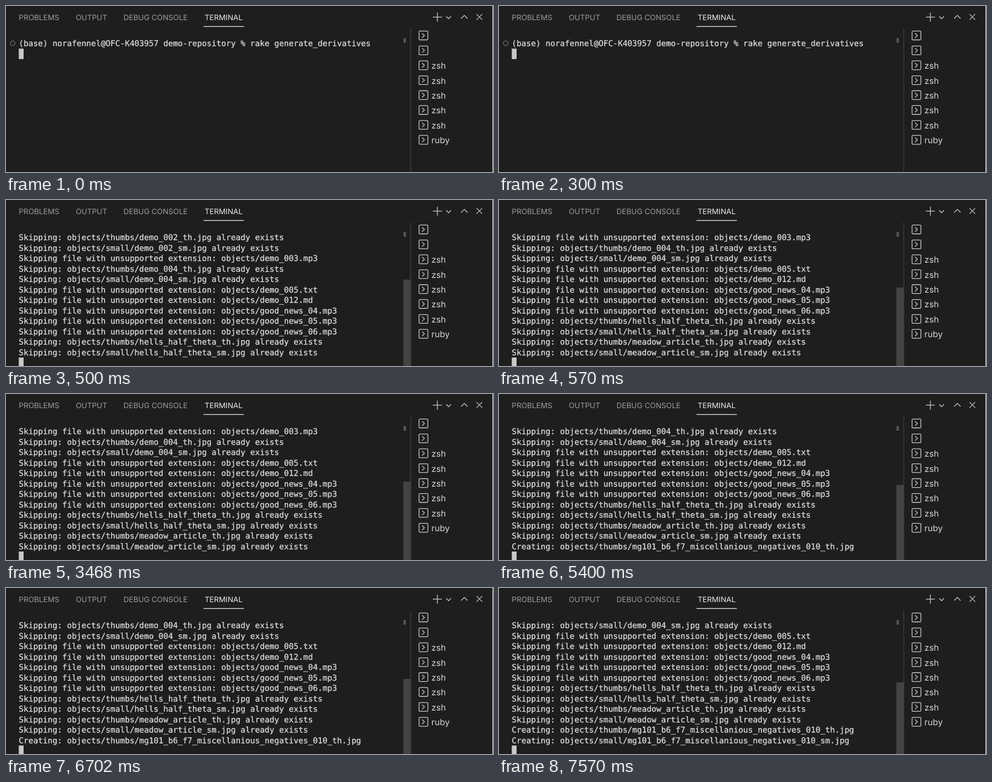
Recreate the animation shown at these times as an HTML page. Size 858 px wide and 294 px high, loop 8 s.

```html
<!DOCTYPE html>
<html lang="en">
<head>
<meta charset="utf-8">
<title>Terminal</title>
<style>
  html, body { margin: 0; width: 100%; height: 100%; overflow: hidden; background: #1e1e1e; }
  svg { display: block; width: 858px; height: 294px; }
  text { white-space: pre; text-rendering: geometricPrecision; }
  .tabs { font: 13.2px Inter, sans-serif; fill: #9d9d9d; }
  .tabs .active { fill: #ececec; }
  .shells { font: 15.2px Inter, sans-serif; fill: #d6d6d6; }
  .lines { font: 14.12px "DejaVu Sans Mono", monospace; fill: #e0e0e0; stroke: #e0e0e0; stroke-width: .25; }
  .icon { fill: none; stroke: #cacaca; stroke-width: 1.3; }
</style>
</head>
<body>
<svg viewBox="0 0 858 294">
  <rect width="858" height="294" fill="#1e1e1e"/>
  <g class="tabs">
    <text x="22.5" y="25">PROBLEMS</text>
    <text x="123" y="25">OUTPUT</text>
    <text x="207" y="25">DEBUG CONSOLE</text>
    <text x="350" y="25" class="active">TERMINAL</text>
  </g>
  <rect x="348" y="35.7" width="71" height="1.3" fill="#e7e7e7"/>
  <path class="icon" d="M752 19.7h16M760 11.7v16M775.5 18.2l4.3 4.3 4.3-4.3M801.8 22.3l5.7-5.7 5.7 5.7M829 14.4l10 10m0-10l-10 10"/>
  <rect x="712.5" y="40" width="1.3" height="254" fill="#414141"/>
  <rect x="700.5" y="57" width="4" height="8" fill="#5a5a5a"/>
  <g id="shells" class="shells"></g>
  <circle id="mark" cx="11.7" cy="66" r="4.1" fill="none" stroke="#6a6a6a" stroke-width="1.4"/>
  <rect id="bar" x="700" width="13" fill="#434343"/>
  <g id="lines" class="lines"></g>
  <rect id="cursor" x="22.5" width="8.5" height="18.5" fill="#c8c8c8"/>
  <rect x="857" width="1" height="294" fill="#e4e4e4"/>
</svg>
<script>
const $ = id => document.getElementById(id);
const ROW = 18.5, ROWS = 12, LOOP = 8000;

const skip = name => ["thumbs", "small"].map((dir, i) =>
  `Skipping: objects/${dir}/${name}_${["th", "sm"][i]}.jpg already exists`);
const unsupported = file => `Skipping file with unsupported extension: objects/${file}`;
const create = (dir, end) =>
  `Creating: objects/${dir}/mg101_b6_f7_miscellanious_negatives_010_${end}.jpg`;

const prompt = ["(base) norafennel@OFC-K403957 demo-repository % rake generate_derivatives"];
const log = [
  ...skip("demo_002"),
  unsupported("demo_003.mp3"),
  ...skip("demo_004"),
  ...["demo_005.txt", "demo_012.md", "good_news_04.mp3", "good_news_05.mp3", "good_news_06.mp3"].map(unsupported),
  ...skip("hells_half_theta"),
  ...skip("meadow_article"),
  create("thumbs", "th"),
  create("small", "sm")
];

// start time, first visible log line, top of the scrollbar
const steps = [
  { at: 0 },
  { at: 500, first: 0, bar: 141 },
  { at: 570, first: 2, bar: 155 },
  { at: 5400, first: 3, bar: 161 },
  { at: 7570, first: 4, bar: 167 }
];

$("shells").innerHTML = ["", "", "zsh", "zsh", "zsh", "zsh", "zsh", "ruby"].map((name, i) => `
  <g transform="translate(727 ${43.9 + i * 26.4})">
    <rect class="icon" x=".7" y=".5" width="15.6" height="15.6" rx="1.5"/>
    <path class="icon" d="M6 4.3l4.2 4-4.2 4"/>
    <text x="22.5" y="14.5">${name}</text>
  </g>`).join("");

function show({ first, bar = 294 }) {
  const running = first !== undefined;
  const rows = running ? log.slice(first, first + ROWS) : prompt;
  $("lines").innerHTML = rows.map((row, i) =>
    `<text x="22.5" y="${71.3 + i * ROW}">${row}</text>`).join("");
  $("cursor").setAttribute("y", 57 + rows.length * ROW);
  $("bar").setAttribute("y", bar);
  $("bar").setAttribute("height", 294 - bar);
  $("mark").style.display = running ? "none" : "";
}

let current;
function draw() {
  const t = performance.now() % LOOP;
  const step = steps.findLast(s => s.at <= t);
  if (step !== current) show(current = step);
  requestAnimationFrame(draw);
}
draw();
</script>
</body>
</html>
```
